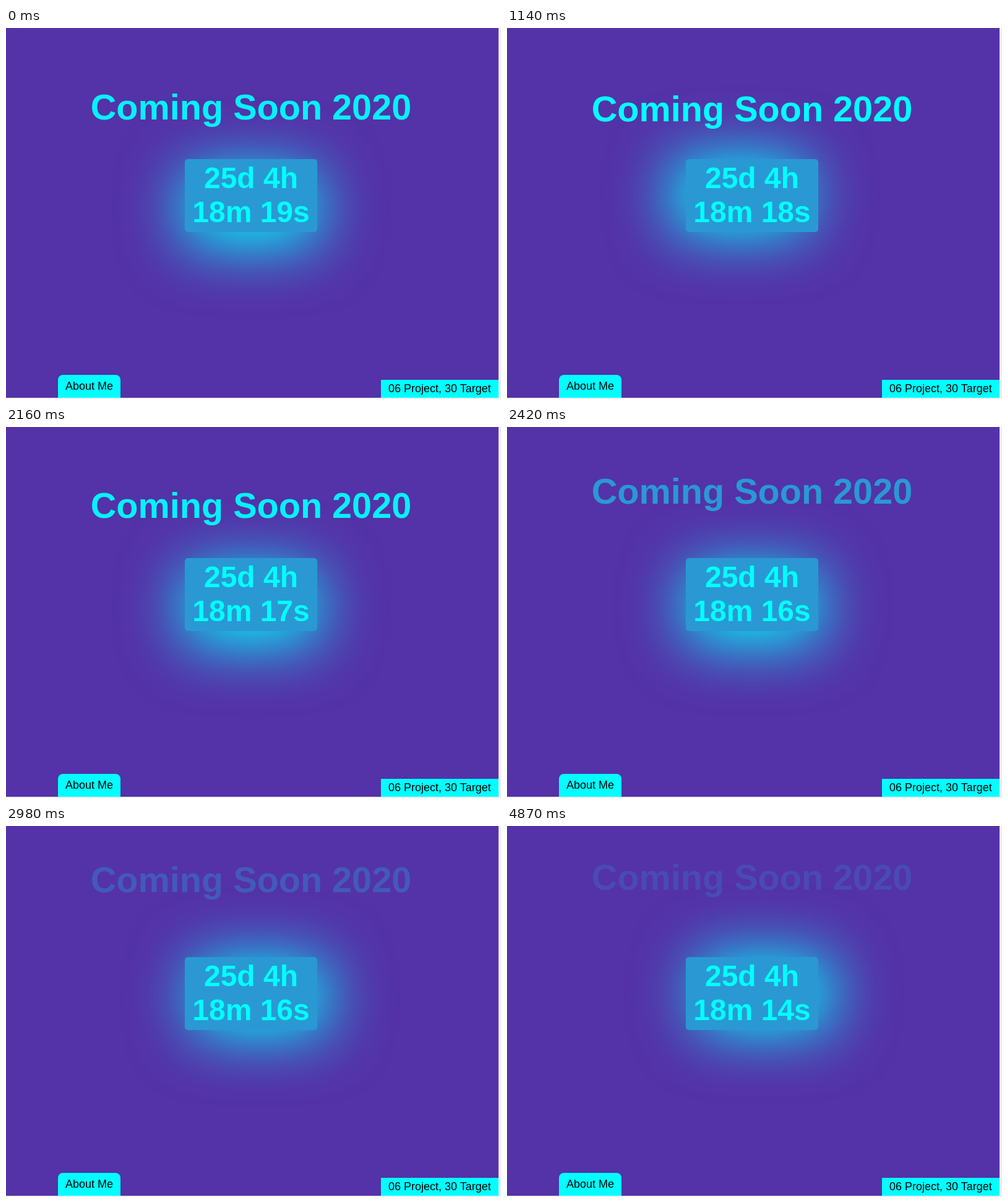
An HTML page that plays this animation: 800 by 600 pixels, repeating every 5030 ms.

```html
<!DOCTYPE html>
<html lang="en">
<head>
<meta charset="utf-8">
<title>Coming Soon</title>
<style>
  html, body { margin: 0; width: 100%; height: 100%; overflow: hidden; background: #eee; }
  body { position: relative; }
  .page { position: absolute; left: 0; top: 0; width: 796px; height: 598px; overflow: hidden; background: #5432a8; }
  .timer {
    position: absolute; left: 289px; top: 212px; width: 214px; height: 118px;
    border-radius: 5px; background: rgba(0, 255, 255, .5);
  }
  .tab { position: absolute; background: #0ff; }
  .about { left: 84px; top: 561px; width: 101px; height: 37px; border-radius: 8px 8px 0 0; }
  .count { left: 606px; top: 569px; width: 190px; height: 29px; }
  svg { position: absolute; left: 0; top: 0; }
  text { font-family: Arial, "Liberation Sans", sans-serif; fill: #0ff; }
  .big { font-weight: bold; font-size: 48px; text-anchor: middle; }
  .title { font-size: 57.6px; }
  .small { font-size: 18px; fill: #000; }
</style>
</head>
<body>
<div class="page">
  <div class="timer" id="timer"></div>
  <div class="tab about"></div>
  <div class="tab count"></div>
  <svg width="796" height="598">
    <text id="title" class="big title" x="396">Coming Soon 2020</text>
    <text class="big" x="396" y="259">25d 4h</text>
    <text id="clock" class="big" x="396" y="314">18m 19s</text>
    <text class="small" x="96" y="585">About Me</text>
    <text class="small" x="618" y="589">06 Project, 30 Target</text>
  </svg>
</div>
<script>
  const LOOP = 5030;
  const PEAK = 1080;   // title at its lowest and brightest
  const BASE = 151;    // title baseline at the peak
  const RISE = 48.3;   // how far the title climbs
  const SWING = 20;    // reach of the glow around the timer

  const $ = id => document.getElementById(id);
  const title = $('title'), clock = $('clock'), timer = $('timer');

  function smooth(from, to, v) {
    const p = Math.min(1, Math.max(0, (v - from) / (to - from)));
    return p * p * (3 - 2 * p);
  }

  // Slow start away from the peak, then a quick climb that settles.
  function lift(t) {
    const p = (t - PEAK) / PEAK;
    return p < 1 ? .07 * p ** 4 : 1 - .93 * Math.exp((1 - p) * PEAK / 340);
  }

  // The glow goes from left to below, then from below to right.
  function sway(t) {
    const away = Math.abs(t - PEAK);
    return SWING * (smooth(520, 1120, away) + smooth(1120, 2320, away) - 1);
  }

  function draw(t) {
    const climb = RISE * lift(t), x = sway(t);
    title.setAttribute('y', BASE - climb);
    title.setAttribute('opacity', 1 - climb * .0182);
    timer.style.boxShadow = `${x}px ${SWING - Math.abs(x)}px 100px #0ff`;
    clock.textContent = `18m ${19 - Math.floor((t + 720) / 1000)}s`;
  }

  const start = performance.now();
  function frame() {
    draw((performance.now() - start) % LOOP);
    requestAnimationFrame(frame);
  }
  frame();
</script>
</body>
</html>
```
